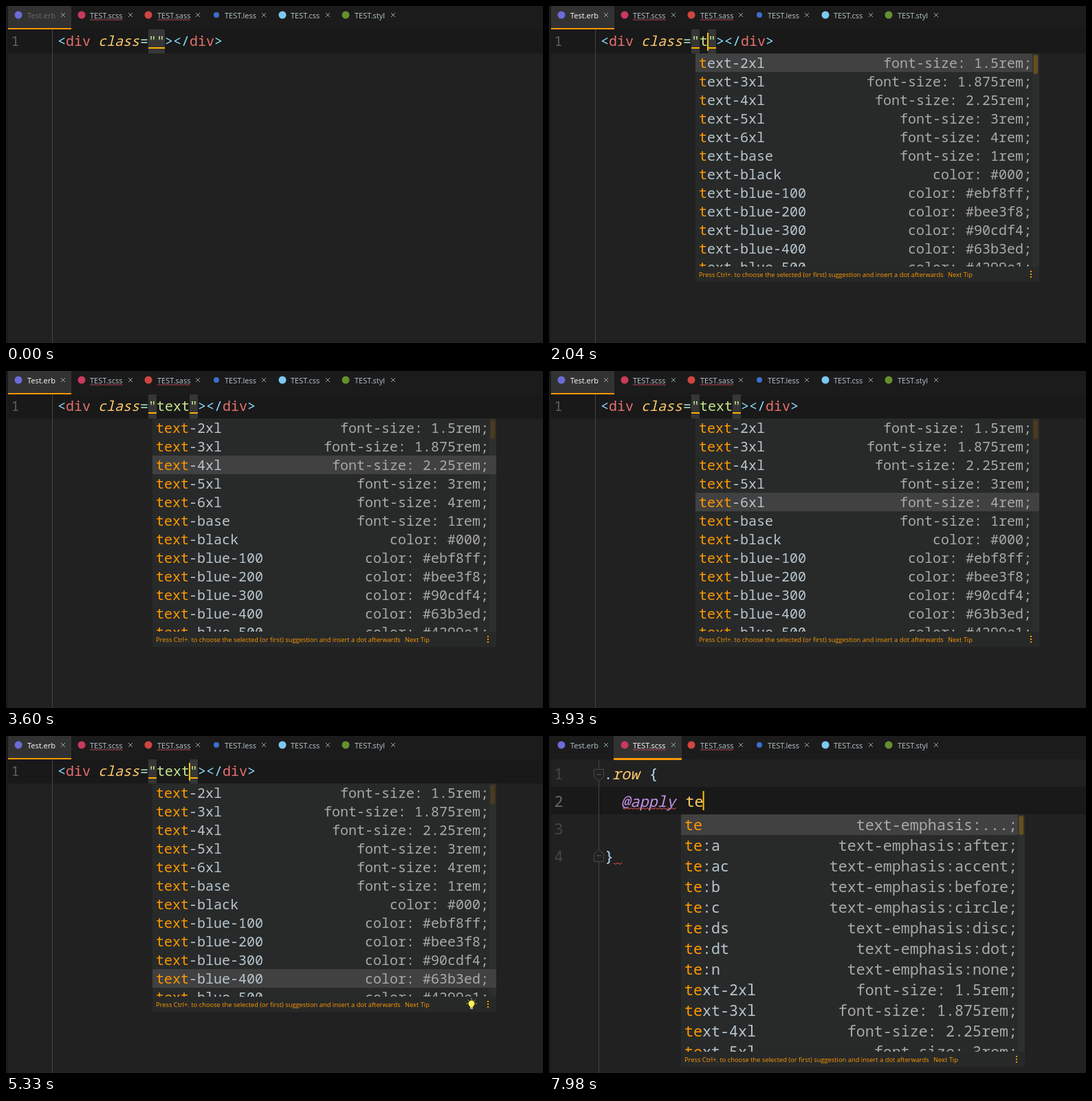
Recreate the animation shown at these times as an HTML page with a canvas. Size 781 by 490 pixels, loop 8 s.

```html
<!DOCTYPE html>
<html lang="en">
<head>
<meta charset="utf-8">
<title>Editor completion</title>
<style>
html, body { margin: 0; width: 100%; height: 100%; overflow: hidden; background: #212121; }
canvas { display: block; }
</style>
</head>
<body>
<canvas id="stage" width="781" height="490"></canvas>
<script>
const ctx = document.getElementById('stage').getContext('2d');
const LOOP = 8000;
const MONO = '"Noto Sans Mono", "DejaVu Sans Mono", monospace';
const UI = '"Open Sans", "Noto Sans", sans-serif';
const C = {
  bg: '#212121', bar: '#1b1b1b', row: '#191919', tab: '#323232', accent: '#ff9800',
  text: '#b8c6cd', dim: '#a9a9a9', punct: '#89ddff', tag: '#e8706f', attr: '#ffcb6b',
  str: '#c3e88d', rule: '#c792ea', error: '#ef5350', caret: '#ffc107'
};

// label, icon colour, left edge, icon x, text x, close x, right edge, has errors
const TABS = [
  ['Test.erb', '#6c6bd8', 3, 18, 31, 83, 95, false],
  ['TEST.scss', '#c83a5c', 94, 110, 122, 181, 193, true],
  ['TEST.sass', '#d0453f', 193, 207, 220, 279, 291, true],
  ['TEST.less', '#3a6fd0', 291, 306, 318, 375, 387, false],
  ['TEST.css', '#7cc8f0', 387, 402, 414, 468, 480, false],
  ['TEST.styl', '#64902f', 480, 494, 507, 563, 575, false]
];

const SIZES = [['2xl', '1.5'], ['3xl', '1.875'], ['4xl', '2.25'], ['5xl', '3'], ['6xl', '4'], ['base', '1']]
  .map(([n, v]) => ['text-' + n, `font-size: ${v}rem;`]);
const BLUES = ['ebf8ff', 'bee3f8', '90cdf4', '63b3ed', '4299e1']
  .map((c, i) => [`text-blue-${i + 1}00`, `color: #${c};`]);
const EMPHASIS = [['', '...'], [':a', 'after'], [':ac', 'accent'], [':b', 'before'],
  [':c', 'circle'], [':ds', 'disc'], [':dt', 'dot'], [':n', 'none']]
  .map(([n, v]) => ['te' + n, `text-emphasis:${v};`]);

const HTML_POPUP = {
  x: 213, y: 69, h: 332, rowH: 27, px: 20,
  items: [...SIZES, ['text-black', 'color: #000;'], ...BLUES]
};
const SCSS_POPUP = {
  x: 192, y: 114, h: 367, rowH: 30, px: 21.7,
  items: [...EMPHASIS, ...SIZES.slice(0, 4)]
};

// Moments of each event, in ms
const FOCUS = 1490, POPUP = 2040, SWITCH = 6240, POPUP2 = 7980, BULB = 5020;
const TYPE_HTML = [1960, 2240, 2600, 2970];
const TYPE_SCSS = [7060, 7670, 7830];
const SELECT = [3380, 3560, 3750, 3930, 4080, 4230, 4390, 4540, 4700, 4850];

const PATHS = [
  { until: 1960, keys: [[70, 539, 395], [304, 400, 255], [538, 259, 114], [930, 259, 114], [1250, 221, 55]] },
  { until: 6980, keys: [[5710, 221, 55], [6080, 143, 14], [6300, 143, 14], [6690, 229, 97]] }
];

const passed = (times, t) => times.filter(v => t >= v).length;

function rect(x, y, w, h, color) {
  ctx.fillStyle = color;
  ctx.fillRect(x, y, w, h);
}

function label(str, x, y, color, font, align = 'left') {
  ctx.font = font;
  ctx.textAlign = align;
  ctx.fillStyle = color;
  ctx.fillText(str, x, y);
}

function line(points, color, width = 1) {
  ctx.beginPath();
  points.forEach(([x, y]) => ctx.lineTo(x, y));
  ctx.strokeStyle = color;
  ctx.lineWidth = width;
  ctx.stroke();
}

function dot(x, y, r, color) {
  ctx.beginPath();
  ctx.arc(x, y, r, 0, Math.PI * 2);
  ctx.fillStyle = color;
  ctx.fill();
}

function wave(x, y, w, step, color) {
  const pts = [];
  for (let i = 0; i * step <= w; i++) pts.push([x + i * step, y + (i % 2 ? 1 : -1) * step / 3]);
  line(pts, color);
}

// Draws [text, colour, italic] runs on a fixed character grid
function code(runs, x, y, px) {
  for (const [str, color, italic] of runs) {
    label(str, italic ? x - 1 : x, y, color, `${italic ? 'italic ' : ''}${px}px ${MONO}`);
    x += str.length * px * 0.6;
  }
}

function drawTabs(active, focused) {
  rect(0, 0, 781, 34, C.bar);
  TABS.forEach(([name, color, left, iconX, textX, closeX, right, bad], i) => {
    const on = i === active;
    if (on) {
      rect(left, 0, right - left, 34, C.tab);
      rect(left, 32, right - left, 3, C.accent);
    }
    dot(iconX, 13, i === 3 ? 4 : 5.5, color);
    const ink = !on ? C.text : focused ? '#ffffff' : '#6a6a6a';
    label(name, textX, 17.5, ink, `11px ${UI}`);
    if (bad) wave(textX, 20, 49, 2, '#b8485a');
    const a = closeX - 3, b = closeX + 3;
    line([[a, 10], [b, 16]], '#90a4ae');
    line([[a, 16], [b, 10]], '#90a4ae');
  });
}

function drawPopup(p, prefix, selected, bulb) {
  const { x, y, h, rowH, px, items } = p;
  const foot = y + h - 22;
  const font = `${px}px ${MONO}`;
  rect(x, y, 500, h, '#282a2a');
  ctx.save();
  ctx.beginPath();
  ctx.rect(x, y, 500, foot - y);
  ctx.clip();
  rect(x + 490, y, 10, h, '#2d2f2f');
  rect(x, y + selected * rowH, selected ? 500 : 490, rowH, '#414141');
  items.forEach(([name, detail], i) => {
    const base = Math.round(y + rowH * (i + 0.5) + px * 0.37);
    label(name.slice(0, prefix), x + 5, base, C.accent, font);
    label(name.slice(prefix), x + 5 + prefix * px * 0.6, base, C.text, font);
    label(detail, x + 489, base, C.dim, font, 'right');
  });
  ctx.beginPath();
  ctx.roundRect(x + 491.5, y + 2, 6.5, 28, 3);
  ctx.fillStyle = selected ? '#4d3a1d' : '#66501f';
  ctx.fill();
  ctx.restore();
  rect(x, foot, 500, 22, '#272929');
  const small = `9.33px ${UI}`;
  label('Press Ctrl+. to choose the selected (or first) suggestion and insert a dot afterwards', x + 5, foot + 15, C.accent, small);
  label('Next Tip', x + 367, foot + 15, C.accent, small);
  for (let i = 0; i < 3; i++) rect(x + 487, foot + 6 + i * 4, 2, 2, C.accent);
  if (bulb) drawBulb(x + 464, foot + 10);
}

function drawBulb(x, y) {
  for (let i = 0; i < 5; i++) {
    const a = Math.PI * (1 + i / 4), c = Math.cos(a), s = Math.sin(a);
    line([[x + c * 6, y + s * 6], [x + c * 7.5, y + s * 7.5]], '#ffe94a');
  }
  dot(x, y, 4.5, '#ffee55');
  rect(x - 2, y + 3, 4, 3, '#ffee55');
  rect(x - 2, y + 6.5, 4, 1.5, '#c8c8c8');
}

function drawHtml(t) {
  const typed = passed(TYPE_HTML, t);
  const quote2 = 219 + typed * 12;
  rect(3, 34, 778, 35, C.row);
  rect(67, 34, 1, 456, '#454545');
  label('1', 7.5, 58, '#5b6262', `20px ${MONO}`);
  for (const x of [207, quote2]) rect(x, 34, 12, 35, '#363636');
  code([
    ['<', C.punct], ['div', C.tag], [' ', C.punct], ['class', C.attr, true], ['=', '#a8dcc8'],
    ['"' + 'text'.slice(0, typed) + '"', C.str],
    ['></', C.punct], ['div', C.tag], ['>', C.punct]
  ], 75, 58, 20);
  for (const x of [207, quote2]) rect(x, 60, 12, 2, '#ffb300');

  if (t >= POPUP && t < SWITCH) drawPopup(HTML_POPUP, typed, passed(SELECT, t), t >= BULB);

  // The caret blinks once typing has paused
  const blink = Math.floor((t - 3020) / 520) % 2 === 0;
  if (t >= FOCUS && (t < 3020 || blink)) rect(quote2 - 1, 39, 2, 26, C.caret);
}

function foldMark(y, dir) {
  ctx.beginPath();
  [[-7, -8], [7, -8], [7, 3], [0, 9], [-7, 3]].forEach(([dx, dy]) => ctx.lineTo(72.5 + dx, y + dy * dir));
  ctx.closePath();
  ctx.fillStyle = C.bg;
  ctx.fill();
  ctx.strokeStyle = '#4c4c4c';
  ctx.lineWidth = 1;
  ctx.stroke();
  rect(69, y - 1, 7, 1, '#5c5c5c');
}

function drawScss(t) {
  const typed = passed(TYPE_SCSS, t);
  rect(3, 74, 778, 40, C.row);
  rect(72, 35, 1, 455, '#454545');
  for (let i = 0; i < 4; i++) {
    label(i + 1, 7.5, 63 + i * 40, i === 1 ? '#5f6b6e' : '#444848', `22px ${MONO}`);
  }
  foldMark(56.5, 1);
  foldMark(174.5, -1);
  code([['.', C.punct], ['row', C.attr, true], [' {', '#b5dcf2']], 79.6, 63, 22);
  code([['@apply', C.rule, true], [' te'.slice(0, typed), C.attr]], 106, 103, 22);
  code([['}', '#b5dcf2']], 81, 183, 22);
  wave(107, 105.5, 78, 3, C.error);
  wave(94, 185.5, 12, 3, C.error);
  rect(184 + typed * 13.2, 80, 2, 28, C.caret);
  if (t >= POPUP2) drawPopup(SCSS_POPUP, 2, 0, false);
}

function drawMouse(t) {
  const path = PATHS.find(p => t >= p.keys[0][0] && t < p.until);
  if (!path) return;
  const { keys } = path;
  const q = Math.max(keys[0][0], 70 + Math.floor((t - 70) / 78) * 78);
  const next = keys.findIndex(k => k[0] > q);
  let [, x, y] = keys[keys.length - 1];
  if (next > 0) {
    const [t0, x0, y0] = keys[next - 1], [t1, x1, y1] = keys[next];
    const f = (q - t0) / (t1 - t0);
    x = x0 + (x1 - x0) * f;
    y = y0 + (y1 - y0) * f;
  }
  x = Math.round(x);
  y = Math.round(y);
  if (y < 34) {
    ctx.beginPath();
    [[0, 0], [0, 16], [4, 12], [7, 18], [9, 17], [6, 11], [11, 11]].forEach(([dx, dy]) => ctx.lineTo(x + dx, y + dy));
    ctx.fillStyle = '#ffffff';
    ctx.fill();
    return;
  }
  const ink = '#e0e0e0';
  rect(x, y - 7, 1, 15, ink);
  for (const dy of [-8, 8]) {
    rect(x - 3, y + dy, 3, 1, ink);
    rect(x + 1, y + dy, 3, 1, ink);
  }
}

function draw(t) {
  const scss = t >= SWITCH;
  rect(0, 0, 781, 490, C.bg);
  rect(0, 34, 3, 456, C.bar);
  drawTabs(scss ? 1 : 0, t >= FOCUS);
  (scss ? drawScss : drawHtml)(t);
  drawMouse(t);
}

let start;
function tick(now) {
  start ??= now;
  draw((now - start) % LOOP);
  requestAnimationFrame(tick);
}
requestAnimationFrame(tick);
</script>
</body>
</html>
```
